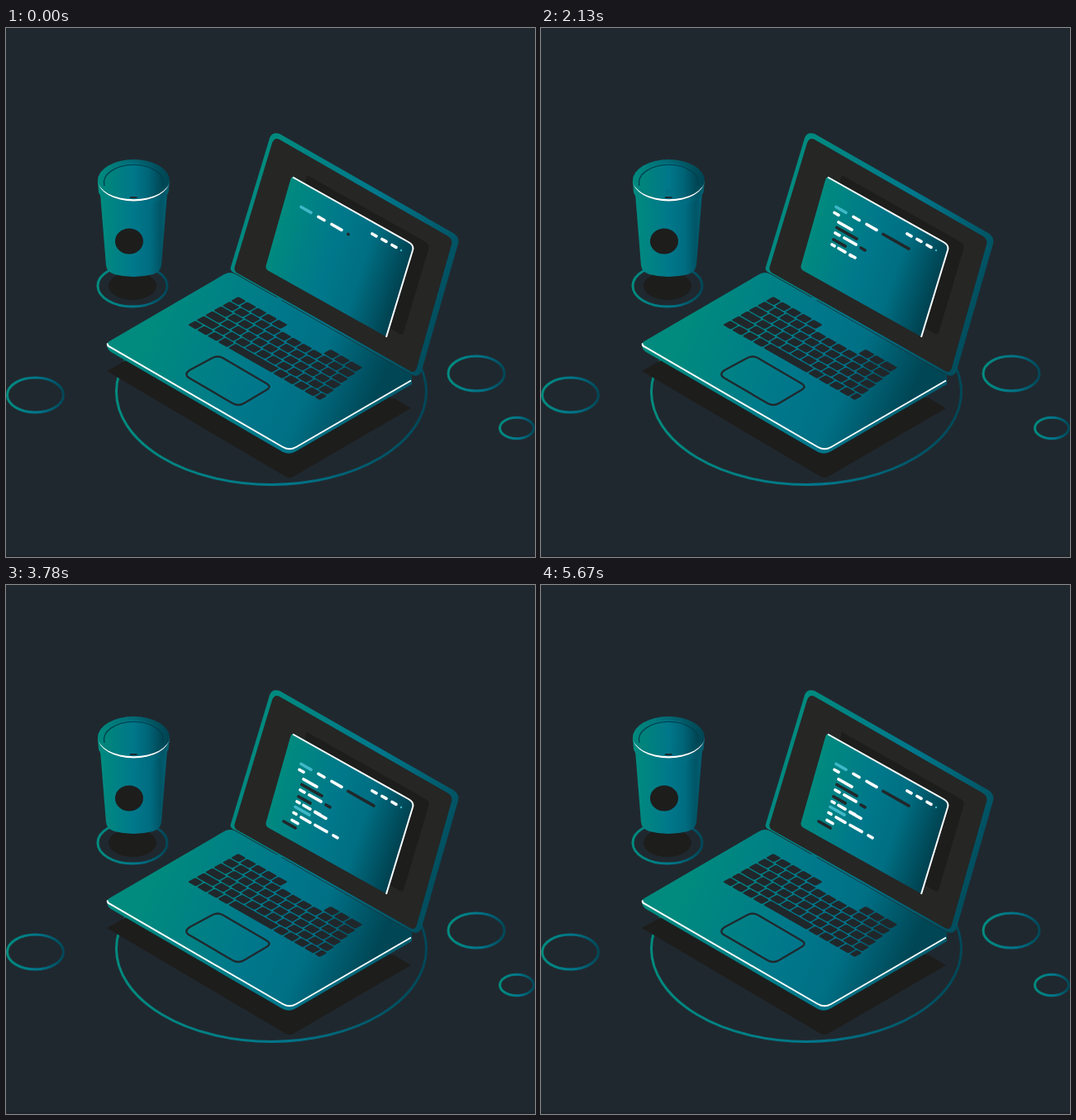
These frames come from a looping animation (640 by 640 pixels, 5790 ms). An HTML page:

```html
<!DOCTYPE html>
<html lang="en">
<head>
<meta charset="utf-8">
<title>Laptop and coffee</title>
<style>
html, body { margin: 0; width: 100%; height: 100%; overflow: hidden; background: #20282f; }
svg { display: block; width: 100%; height: 100%; }
</style>
</head>
<body>
<svg viewBox="0 0 640 640">
  <defs>
    <linearGradient id="ring">
      <stop offset="0" stop-color="#008b7e"/><stop offset=".55" stop-color="#00758a"/><stop offset="1" stop-color="#004757"/>
    </linearGradient>
    <linearGradient id="base" gradientUnits="userSpaceOnUse" x1="190" y1="330" x2="450" y2="440">
      <stop offset="0" stop-color="#008b7e"/><stop offset=".5" stop-color="#00778b"/><stop offset=".72" stop-color="#007085"/><stop offset="1" stop-color="#004655"/>
    </linearGradient>
    <linearGradient id="side" gradientUnits="userSpaceOnUse" x1="122" y1="0" x2="491" y2="0">
      <stop offset="0" stop-color="#008b7e"/><stop offset=".55" stop-color="#00778b"/><stop offset="1" stop-color="#005a6c"/>
    </linearGradient>
    <linearGradient id="lid" gradientUnits="userSpaceOnUse" x1="290" y1="190" x2="545" y2="300">
      <stop offset="0" stop-color="#008b7e"/><stop offset=".55" stop-color="#00778b"/><stop offset="1" stop-color="#004e5e"/>
    </linearGradient>
    <linearGradient id="screen" gradientUnits="userSpaceOnUse" x1="325" y1="240" x2="482" y2="292">
      <stop offset="0" stop-color="#008b7e"/><stop offset=".45" stop-color="#00788b"/><stop offset=".7" stop-color="#006f83"/><stop offset="1" stop-color="#004453"/>
    </linearGradient>
    <linearGradient id="cup">
      <stop offset="0" stop-color="#008b7e"/><stop offset=".5" stop-color="#00788b"/><stop offset=".75" stop-color="#006c80"/><stop offset=".9" stop-color="#005566"/><stop offset="1" stop-color="#006073"/>
    </linearGradient>
    <linearGradient id="rim">
      <stop offset="0" stop-color="#008b7e"/><stop offset=".45" stop-color="#006c78"/><stop offset="1" stop-color="#004352"/>
    </linearGradient>
    <linearGradient id="mouth">
      <stop offset="0" stop-color="#008679"/><stop offset=".5" stop-color="#00778a"/><stop offset=".75" stop-color="#006477"/><stop offset="1" stop-color="#004352"/>
    </linearGradient>
    <linearGradient id="vapour" gradientUnits="userSpaceOnUse" x1="0" y1="88" x2="0" y2="204">
      <stop offset="0" stop-color="#004a5a"/><stop offset=".55" stop-color="#00596a"/><stop offset="1" stop-color="#007688"/>
    </linearGradient>
    <clipPath id="wipe"><rect id="window" x="130" width="60"/></clipPath>
  </defs>

  <rect width="640" height="640" fill="#20282f"/>
  <rect y="637" width="640" height="3" fill="#1d242b"/>

  <g fill="none" stroke="url(#ring)" stroke-width="3">
    <ellipse cx="35.500" cy="444" rx="34" ry="21"/>
    <ellipse cx="569" cy="418" rx="34" ry="21"/>
    <ellipse cx="618" cy="484" rx="20.500" ry="12.700"/>
    <ellipse cx="153" cy="312" rx="42" ry="25"/>
    <ellipse cx="321" cy="440" rx="187.500" ry="112.400"/>
  </g>

  <g id="laptop">
    <path fill="#1d1d1c" d="M122 415L150 399L470 448L490 460L349 542Q343 546 337 542Z"/>
    <path fill="url(#side)" d="M122 382L491 424V431L351 512Q343 517 335 513L127 392Q122 389 122 382Z"/>
    <path fill="url(#base)" d="M125 379L264 298Q271 294 278 298L491 420V425L351 507Q343 511 335 507L125 386Q120 382 125 379Z"/>
    <path fill="none" stroke="#fff" stroke-width="2" d="M123 381.500Q122 384 125 385.500L335 507Q343 511.500 351 507L490 426.500"/>
    <path fill="none" stroke="#1f292e" stroke-width="2.400" d="M222 414L250 399Q256 396 262 399L315 430Q322 434 315 438L288 454Q281 458 274 454L221 423Q215 419 222 414Z"/>
    <g id="keys" fill="#20272b" transform="matrix(1 .57 -1 .56 281 325)"/>

    <path fill="url(#lid)" d="M272 289L319 133Q322 125 331 128L541 248Q549 253 547 261L503 414Q500 423 492 420L278 297Q270 294 272 289Z"/>
    <path fill="#262625" d="M277 288L322 139Q325 132 331 135L535 252Q541 256 539 262L497 411Q495 418 489 415L279 296Q275 293 277 288Z"/>
    <path fill="#1d1d1c" d="M364 178L508 259Q513 262 511 268L481 369Q479 372 475 369L330 290Z"/>
    <path fill="url(#screen)" d="M349 180.500L489 260Q494 263 493 268L461 374L318 294Q313 291 315 286L344 184Q345 179 349 180.500Z"/>
    <path fill="none" stroke="#fff" stroke-width="2" d="M347 180.500L487 259Q494 263 492 269L460 374"/>
    <g id="code" fill="none" stroke-width="3.700" stroke-linecap="round"/>
  </g>

  <g id="mug">
    <ellipse cx="153" cy="312" rx="29" ry="17" fill="#1d1d1c"/>
    <path fill="url(#cup)" d="M114 200L121 287Q122 295 131 298Q154 304 178 298Q187 295 188 287L195 200Z"/>
    <path fill="url(#cup)" d="M111 186L112 199Q118 215 154 216Q190 215 196.500 199L198 186Z"/>
    <ellipse cx="154.500" cy="184.500" rx="43.500" ry="25.500" fill="url(#rim)"/>
    <ellipse cx="154.500" cy="185.500" rx="36" ry="22" fill="url(#mouth)"/>
    <path fill="none" stroke="#00414e" stroke-width="1.300" d="M119 191A36 22 0 1 1 190 191"/>
    <path fill="#fff" d="M111 184A43.500 25.500 0 0 0 198 184A43.500 23.200 0 0 1 111 184Z"/>
    <path stroke="#1d2a30" stroke-width="2" d="M150 205H158.500"/>
    <ellipse cx="149" cy="258" rx="17" ry="15.500" fill="#1d1d1c"/>
  </g>

  <g clip-path="url(#wipe)" fill="url(#vapour)">
    <path d="M155 109C143 123 144 140 149 153C154 166 149 186 152 204C168 192 173 172 162 152C154 139 149 128 155 109Z"/>
    <path d="M171 87C158 98 156 113 161.500 127C162 112 163 102 171 87Z"/>
  </g>
</svg>

<script>
const LOOP = 5790, PUFF = 2070, SLOPE = 0.57;
const WHITE = '#fff', DARK = '#20282b', CYAN = '#3fb8c8';
const byId = id => document.getElementById(id);

function add(parent, tag, attrs) {
  const el = document.createElementNS('http://www.w3.org/2000/svg', tag);
  for (const name in attrs) el.setAttribute(name, attrs[name]);
  return parent.appendChild(el);
}

// Keyboard, laid out on a flat grid and skewed by the group transform
for (let row = 0; row < 6; row++) {
  const end = 152 + row * 1.8;
  for (let x = 0, n = 0; x < end - 4; n++) {
    let w = n ? 12.6 : 11 + row % 5 * 2.5;
    if (row === 5 && n === 4) w = 54;
    if (end - x - w < 6) w = end - x;
    const gap = row === 0 && x + w > 62 && x < 104;
    if (!gap) add(byId('keys'), 'rect', { x, y: row * 10.4, width: w - 1.5, height: 9, rx: 1.5 });
    x += w;
  }
}

// Dashes: x, y, horizontal length, colour
const dash = ([x, y, len, stroke]) => ({ x, y, len, el: add(byId('code'), 'path', { stroke }) });
const grow = (d, k) => d.el.setAttribute('d', `M${d.x} ${d.y}l${d.len * k} ${d.len * k * SLOPE}`);

[
  [357, 216.5, 12, CYAN], [378, 228.5, 7, WHITE], [394, 237.5, 12, WHITE],
  [443, 249, 5, WHITE], [455, 255.5, 5, WHITE], [467, 262.5, 5, WHITE]
].forEach(d => grow(dash(d), 1));
add(byId('code'), 'circle', { cx: 478, cy: 269, r: 1.2, fill: CYAN });

let clock = 0;
const typed = [
  [414, 249.5, 31, DARK],
  [355, 223.5, 5, WHITE],
  [360, 235, 16, WHITE],
  [358, 241.5, 24, DARK],
  [356, 248, 5, WHITE], [367, 254, 14, WHITE], [387, 266, 5, DARK],
  [354, 256, 14, DARK],
  [352, 262, 3, WHITE], [360, 266.5, 8, WHITE], [374, 274.5, 6, WHITE],
  [374, 275, 13, WHITE],
  [350, 268.5, 17, CYAN],
  [348, 275.5, 3, WHITE], [357, 281, 11, WHITE], [374, 290.5, 14, WHITE], [396, 303, 5, WHITE],
  [336, 286, 14, DARK],
  [346, 284.5, 7, WHITE]
].map(spec => {
  const d = dash(spec), start = clock, time = 130 + 5.2 * d.len;
  clock += time;
  return { ...d, start, time };
});

function draw(now) {
  const t = now % LOOP;
  for (const d of typed) {
    d.el.style.display = t < d.start ? 'none' : '';
    grow(d, Math.min(1, Math.max(0, (t - d.start) / d.time)));
  }
  // Steam is uncovered upwards, then wiped away from below
  const p = t % PUFF;
  const top = Math.max(84, 205 - 0.15 * p);
  const bottom = Math.min(205, 205 - 0.15 * (p - 690));
  byId('window').setAttribute('y', top);
  byId('window').setAttribute('height', Math.max(0, bottom - top));
}

const begin = performance.now();
function tick() {
  draw(performance.now() - begin);
  requestAnimationFrame(tick);
}
tick();
</script>
</body>
</html>
```
